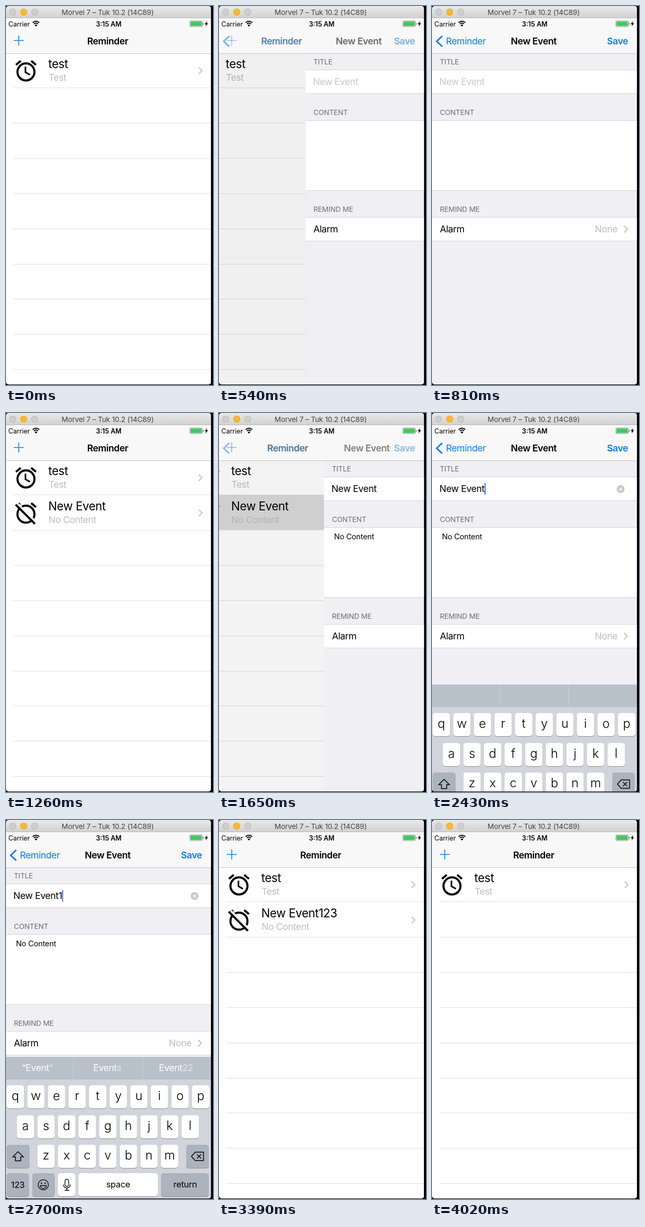
Write an HTML page with a canvas that moves like this. It is 394x720 px and loops after 4470 ms.

```html
<!DOCTYPE html>
<html lang="en">
<head>
<meta charset="utf-8">
<title>Reminder list</title>
<style>
html, body { margin: 0; width: 100%; height: 100%; overflow: hidden; background: #000; }
canvas { display: block; }
</style>
</head>
<body>
<canvas id="stage" width="394" height="720"></canvas>
<script>
const ctx = document.getElementById('stage').getContext('2d');
const LOOP = 4470, STEP = 30, W = 390.4, H = 719;
const BLUE = '#0a7cf5', GREY = '#c3c3c8', LINE = '#d6d6da';
const ROW_TOP = 156, ROW_H = 66.87, MID = 193.5;

const clamp = v => Math.max(0, Math.min(1, v));
const easeOut = p => 1 - (1 - p) ** 3;
const mix = (a, b, p) => a + (b - a) * p;
// The first visible step already shows movement; the last one lands at b.
const span = (t, a, b) => clamp((t - a + STEP) / (b - a + STEP));

function layer(draw, { x = 0, y = 0, alpha = 1, clip } = {}) {
  if (alpha <= 0) return;
  ctx.save();
  if (clip) {
    ctx.beginPath();
    ctx.rect(...clip);
    ctx.clip();
  }
  ctx.translate(x, y);
  ctx.globalAlpha *= alpha;
  draw();
  ctx.restore();
}

function box(x, y, w, h, color) {
  ctx.fillStyle = color;
  ctx.fillRect(x, y, w, h);
}

function pill(x, y, w, h, r, color) {
  ctx.fillStyle = color;
  ctx.beginPath();
  ctx.roundRect(x, y, w, h, r);
  ctx.fill();
}

function dot(x, y, r, color) {
  ctx.fillStyle = color;
  ctx.beginPath();
  ctx.arc(x, y, r, 0, 7);
  ctx.fill();
}

function path(points, color, width, close) {
  ctx.beginPath();
  for (let i = 0; i < points.length; i += 2) ctx.lineTo(points[i], points[i + 1]);
  if (close) ctx.closePath();
  ctx.strokeStyle = color;
  ctx.lineWidth = width;
  ctx.stroke();
}

function arc(x, y, r, a, b, color, width) {
  ctx.beginPath();
  ctx.arc(x, y, r, a, b);
  ctx.strokeStyle = color;
  ctx.lineWidth = width;
  ctx.stroke();
}

// y is the middle of the capital letters; returns the text width.
function text(str, x, y, { size = 17.7, color = '#000', weight = 400, align = 'left', track = -0.45 } = {}) {
  ctx.font = `${weight} ${size}px Inter, Roboto, sans-serif`;
  ctx.letterSpacing = track + 'px';
  ctx.textAlign = align;
  ctx.fillStyle = color;
  ctx.fillText(str, x, y + size * 0.364);
  return ctx.measureText(str).width;
}

function titleBar() {
  const g = ctx.createLinearGradient(0, 0, 0, 22);
  g.addColorStop(0, '#e9e9e9');
  g.addColorStop(1, '#d2d2d2');
  box(0, 0, W, 22, g);
  box(0, 22, W, 1, '#b8b8b8');
  ['#cecece', '#fdb827', '#cecece'].forEach((c, i) => {
    const x = 12.7 + i * 21;
    dot(x, 11.5, 6.6, i === 1 ? '#e5a32a' : '#b7b7b7');
    dot(x, 11.5, 5.8, c);
  });
  text('Morvel 7 – Tuk 10.2 (14C89)', MID, 12, { size: 13.6, color: '#444', align: 'center', track: -0.1 });
}

function statusBar() {
  const style = { size: 12.5, track: 0 };
  text('Carrier', 4.5, 34, style);
  text('3:15 AM', 195.5, 34, { ...style, weight: 600, align: 'center' });
  for (const r of [9, 5.6]) arc(57, 38, r, -Math.PI * 0.75, -Math.PI * 0.25, '#000', 2);
  ctx.fillStyle = '#000';
  ctx.beginPath();
  ctx.moveTo(57, 39);
  ctx.arc(57, 39, 3.6, -Math.PI * 0.75, -Math.PI * 0.25);
  ctx.fill();
  pill(349.5, 28, 24.5, 11.5, 2.5, '#777');
  pill(350.2, 28.7, 23.1, 10.1, 2, '#fff');
  pill(351, 29.5, 21.5, 8.5, 1.2, '#45c662');
  pill(374.5, 32, 1.6, 4, 1, '#777');
  ctx.fillStyle = '#000';
  ctx.beginPath();
  [383, 28.5, 378.2, 34.6, 381, 34.6, 379.8, 39, 384.6, 32.8, 381.8, 32.8]
    .forEach((v, i, a) => { if (i % 2) ctx.lineTo(a[i - 1], v); });
  ctx.fill();
}

// p: 0 shows the list header, 1 the event form header.
function navBar(p, saveAlpha) {
  box(0, 23, W, 67, '#f8f8f8');
  box(0, 90, W, 1, '#c4c4c6');
  statusBar();
  const bold = { weight: 600, align: 'center' };
  const backX = mix(MID, 64.5, p);
  layer(() => {
    path([24.3, 56, 24.3, 75], BLUE, 1.5);
    path([14.8, 65.5, 33.8, 65.5], BLUE, 1.5);
    text('Reminder', backX, 67, bold);
  }, { alpha: 1 - p });
  layer(() => {
    path([19.5, 57, 9, 67, 19.5, 77], BLUE, 2.9);
    text('Reminder', backX, 67, { color: BLUE, align: 'center' });
    text('New Event', mix(365, MID, p), 67, bold);
  }, { alpha: p });
  layer(() => text('Save', 353, 67, { ...bold, color: BLUE }), { alpha: p * saveAlpha });
}

function chevron(x, y, r = 6) {
  path([x - r, y - r, x, y, x - r, y + r], GREY, 2);
}

function clock(y, off, back) {
  layer(() => {
    arc(38, 0, 16.2, 0, 7, '#000', 4);
    path([48, -21, 57, -13.5], '#000', 4);
    if (off) {
      path([23, -17, 27, -20.5], '#000', 4);
      path([23, -19, 59, 17], back, 4);
      path([18.5, -18, 55, 18.5], '#000', 4);
    } else {
      path([19, -13.5, 28, -21], '#000', 4);
      path([37, -10, 37, 0.5, 45.5, 5.5], '#000', 3);
    }
  }, { y });
}

function listRow(index, title, note, off, back = '#fff') {
  const y = 89 + index * ROW_H;
  if (index) box(0, ROW_TOP, W, ROW_H - 1, back);
  clock(y + 36.3, off, back);
  text(title, 80.5, y + 21, { size: 22.2, track: -0.35 });
  text(note, 81, y + 47, { color: '#bdbdc0' });
  chevron(373, y + 34);
}

function list(state) {
  box(0, 91, W, H - 91, '#fff');
  listRow(0, 'test', 'Test', false);
  if (state.name) {
    layer(() => {
      box(W, ROW_TOP, 86, ROW_H - 1, '#fe3b30');
      text('Delete', W + 42, ROW_TOP + 33, { color: '#fff', align: 'center' });
      listRow(1, state.name, 'No Content', true, state.pressed ? '#d9d9d9' : '#fff');
    }, { x: -state.swipe, alpha: 1 - state.gone, clip: [0, ROW_TOP, W, ROW_H - 1] });
  }
  for (let i = 0; i < 9; i++) box(14, Math.round(155.2 + i * ROW_H), W - 14, 1, '#dfdfe1');
}

function field(y, h) {
  box(0, y, W, h, '#fff');
  box(0, y - 1, W, 1, LINE);
  box(0, y + h, W, 1, LINE);
}

function form({ value, note, focus }) {
  box(0, 91, W, H - 91, '#efeff4');
  field(122, 44);
  field(218, 132);
  field(402, 44);
  const head = { size: 13.5, color: '#6d6d72', track: -0.1 };
  text('TITLE', 15, 106, head);
  text('CONTENT', 15, 202, head);
  text('REMIND ME', 15, 386, head);
  const w = text(value || 'New Event', 14, focus ? 144 : 143.5, { color: value ? '#000' : '#c7c7cd', track: -0.4 });
  if (focus) {
    box(14 + w, 133, 2, 22, '#3478d8');
    dot(359, 144.5, 7.5, '#c7c7cc');
    path([356, 141.5, 362, 147.5], '#fff', 1.4);
    path([362, 141.5, 356, 147.5], '#fff', 1.4);
  }
  if (note) text(note, 19, 235, { size: 14.5, track: -0.15 });
  text('Alarm', 15, 424);
  text('None', 353, 424, { color: '#bdbdc2', align: 'right' });
  chevron(372, 424, 6.5);
}

function key(x, y, w, dark) {
  pill(x, y + 1, w, 44, 5, '#8b8e94');
  pill(x, y, w, 44, 5, dark ? '#abb3be' : '#fff');
}

function hint(head, tail, x) {
  const style = { color: '#fff' };
  const w = text(head, x, 470.5, style);
  layer(() => text(tail, x + w, 470.5, style), { alpha: 0.6 });
}

function keyboard(shown, typed) {
  box(0, 450, W, 43, '#b8c0ca');
  box(0, 493, W, 228, '#d1d5db');
  box(128, 450, 1, 43, '#cbd1d7');
  box(259.5, 450, 1, 43, '#cbd1d7');
  layer(() => {
    hint('“Event', '”', 30);
    hint('Event', 's', 166);
    hint('Event', '22', 291);
  }, { alpha: shown * (1 - typed) });
  layer(() => text('“Event123”', 64, 470.5, { color: '#fff', align: 'center' }), { alpha: typed });

  const rows = [['qwertyuiop', 17.7, 504], ['asdfghjkl', 37, 561], ['zxcvbnm', 76.2, 617]];
  for (const [letters, x0, y] of rows) {
    [...letters].forEach((c, i) => {
      const x = x0 + i * 39.2;
      key(x - 16.5, y, 33);
      text(c, x, y + 19.5, { size: 23.5, weight: 350, align: 'center', track: 0 });
    });
  }

  key(1, 617, 44, true);
  path([23, 630, 33, 640, 28, 640, 28, 647.5, 18, 647.5, 18, 640, 13, 640], '#000', 1.5, true);
  key(343, 617, 43, true);
  path([353, 639, 360, 631, 376, 631, 376, 647, 360, 647], '#000', 1.5, true);
  path([363.5, 635, 371.5, 643], '#000', 1.5);
  path([371.5, 635, 363.5, 643], '#000', 1.5);

  const small = { size: 16.4, align: 'center', track: -0.3 };
  key(1, 671, 43, true);
  text('123', 22.5, 693.5, small);
  key(50, 671, 42.5, true);
  arc(71, 693, 9.7, 0, 7, '#000', 1.3);
  dot(67.5, 690, 1.3, '#000');
  dot(74.5, 690, 1.3, '#000');
  ctx.beginPath();
  ctx.arc(71, 694.5, 5.6, 0, Math.PI);
  ctx.closePath();
  ctx.strokeStyle = '#000';
  ctx.lineWidth = 1.3;
  ctx.stroke();
  key(99, 671, 33);
  ctx.beginPath();
  ctx.roundRect(112.3, 682.5, 7, 13.5, 3.5);
  ctx.stroke();
  arc(115.8, 692.5, 6.6, 0, Math.PI, '#000', 1.4);
  path([115.8, 699, 115.8, 703.5], '#000', 1.4);
  path([111.5, 703.5, 120, 703.5], '#000', 1.4);
  key(138, 671, 151);
  text('space', 213.5, 692.5, small);
  key(295, 671, 91, true);
  text('return', 341, 692.5, small);
}

// 0 = list on screen, 1 = form on screen
function formShare(t) {
  if (t < 480) return 0;
  if (t < 1050) return easeOut(span(t, 480, 810));
  if (t < 1620) return 1 - easeOut(span(t, 1050, 1260));
  if (t < 3300) return easeOut(span(t, 1620, 1890));
  return 1 - easeOut(span(t, 3300, 3390));
}

function typedTitle(t) {
  const digits = [2670, 2760, 2850].filter(at => t >= at).length;
  return 'New Event' + '123'.slice(0, digits);
}

function draw(t) {
  const p = formShare(t);
  const editing = t >= 1620;
  const focus = t >= 2370;
  box(0, 0, 394, 720, '#000');
  ctx.save();
  ctx.beginPath();
  ctx.roundRect(0, 0, W, H, 5);
  ctx.clip();

  const body = [0, 91, W, H - 91];
  if (p < 1) {
    layer(() => list({
      name: t < 1050 || t >= 4020 ? '' : t < 3300 ? 'New Event' : 'New Event123',
      pressed: t >= 1620 && t < 1890,
      swipe: 85 * easeOut(t < 3540 ? 0 : span(t, 3540, 3750)),
      gone: t < 3900 ? 0 : span(t, 3900, 4020)
    }), { x: -p * W * 0.3, clip: body });
    layer(() => box(0, 91, W, H - 91, '#000'), { alpha: p * 0.1 });
  }
  if (p > 0) {
    layer(() => {
      form({
        value: editing ? typedTitle(t) : '',
        note: editing ? 'No Content' : '',
        focus
      });
      if (focus) {
        const rise = easeOut(span(t, 2370, 2580));
        const shown = t < 2640 ? 0 : span(t, 2640, 2700);
        const typed = t < 2910 ? 0 : span(t, 2910, 3030);
        layer(() => keyboard(shown, typed), { y: (1 - rise) * 270 });
      }
    }, { x: (1 - p) * W, clip: body });
  }

  const press = t >= 3060 && t < 3150 ? mix(0.3, 1, (t - 3060) / 90) : 1;
  navBar(p, press);
  titleBar();
  ctx.restore();
}

function tick(now) {
  draw(Math.floor((now % LOOP) / STEP) * STEP);
  requestAnimationFrame(tick);
}
requestAnimationFrame(tick);
</script>
</body>
</html>
```
